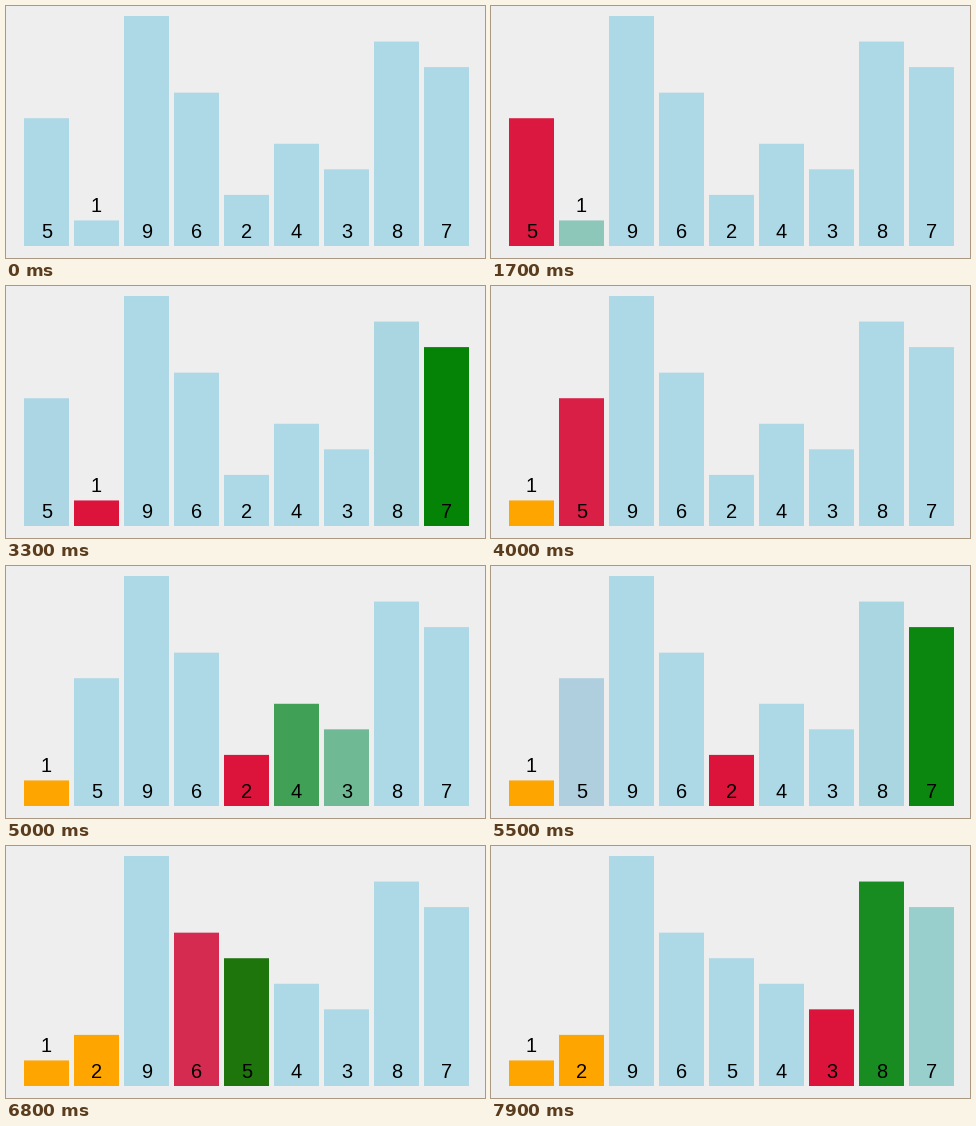
Animation, 479 px wide and 252 px high, one loop 8000 ms. Source, as a matplotlib script:

```python
import numpy as np
import matplotlib.pyplot as plt
from matplotlib.animation import FuncAnimation
from matplotlib.colors import to_rgb
from matplotlib.patches import Rectangle

W, H, DPI = 479, 252, 100
VALUES = [5, 1, 9, 6, 2, 4, 3, 8, 7]
N = len(VALUES)
LEFT, STEP, BAR_W, BASE, UNIT = 18, 50, 45, 240, 230 / 9

PLAIN = to_rgb("lightblue")
MINIMUM = to_rgb("crimson")
COMPARE = to_rgb("green")
SORTED = to_rgb("orange")

FRAMES, INTERVAL = 80, 100
FADE = 1.22  # fade length in steps; the next step cuts it short

# Sorting progress, in steps, at given times in ms
TIMES = [1400, 2600, 4000, 5000, 6100, 6800, 7700, 7900]
STEPS = [0.80, 7.378, 14.927, 20.543, 26.543, 30.378, 35.10, 36.378]


def ease(t):
    """Cubic in-out."""
    t = min(max(t, 0), 1)
    return 4 * t**3 if t < 0.5 else 1 - 4 * (1 - t) ** 3


def selection_sort(passes):
    """Targets (r, g, b, x) of every bar after each step of the sort."""
    order = list(range(N))  # bar shown at each position
    states = []

    def record(done, marks):
        state = np.zeros((N, 4))
        for pos, bar in enumerate(order):
            color = marks.get(pos, SORTED if pos < done else PLAIN)
            state[bar] = (*color, LEFT + STEP * pos)
        states.append(state)

    record(0, {})
    for i in range(passes):
        low = i
        record(i, {low: MINIMUM})
        for j in range(i + 1, N):
            record(i, {low: MINIMUM, j: COMPARE})
            if VALUES[order[j]] < VALUES[order[low]]:
                low = j
                record(i, {low: MINIMUM})
        both = {i: MINIMUM, low: MINIMUM}
        record(i, both)
        order[i], order[low] = order[low], order[i]
        record(i, both)
        record(i + 1, {})
    return states


targets = selection_sort(3)
starts = [targets[0]]
for target in targets:
    last = starts[-1]
    starts.append(last + (target - last) * ease(1 / FADE))


def bars_at(ms):
    step, part = divmod(np.interp(ms, TIMES, STEPS), 1)
    a, b = starts[int(step)], targets[int(step)]
    return a + (b - a) * ease(part / FADE)


fig = plt.figure(figsize=(W / DPI, H / DPI), dpi=DPI, facecolor="#eeeeee")
ax = fig.add_axes([0, 0, 1, 1])
ax.set_xlim(0, W)
ax.set_ylim(H, 0)
ax.axis("off")

bars, labels = [], []
for k, value in enumerate(VALUES):
    top = BASE - value * UNIT
    bar = Rectangle((0, top), BAR_W, BASE - top, lw=0, zorder=2 * k + 1, snap=False)
    bars.append(ax.add_patch(bar))
    baseline = 206 if value == 1 else 232
    labels.append(ax.text(0, baseline, str(value), ha="center", va="baseline",
                          family="Liberation Sans", size=20 * 72 / DPI,
                          color="black", zorder=2 * k + 2))


def draw(i):
    for bar, label, (r, g, b, x) in zip(bars, labels, bars_at(i * INTERVAL)):
        bar.set_facecolor(np.clip((r, g, b), 0, 1))
        bar.set_x(x)
        label.set_x(x + BAR_W / 2)
    return bars + labels


anim = FuncAnimation(fig, draw, frames=FRAMES, interval=INTERVAL,
                     init_func=lambda: draw(0), repeat=True, repeat_delay=0)
plt.show()
```
